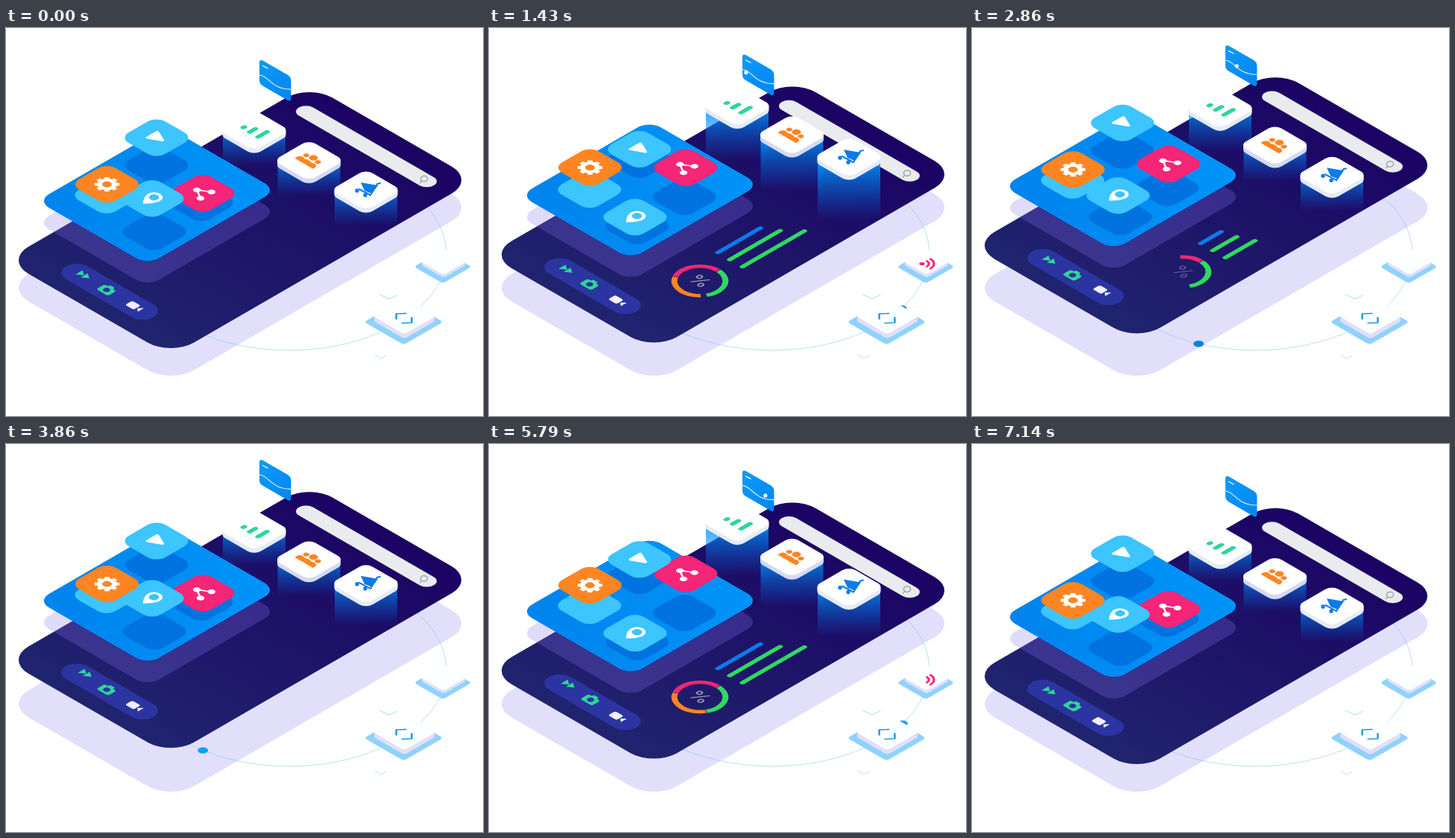
Write an HTML page with a canvas that moves like this. It is 640x520 px and loops after 7210 ms.

```html
<!DOCTYPE html>
<html lang="en">
<head>
<meta charset="utf-8">
<style>
  html, body { margin: 0; width: 100%; height: 100%; overflow: hidden; background: #fff; }
  canvas { display: block; }
</style>
</head>
<body>
<canvas id="stage" width="640" height="520"></canvas>
<script>
const ctx = document.getElementById('stage').getContext('2d');
const LOOP = 7210, HALF = LOOP / 2, TAU = Math.PI * 2;
const SKY = '#3cc5ff', PINK = '#f52577', ORANGE = '#ff8522', MINT = '#2ed59a',
      GREEN = '#2fd95f', BLUE = '#0b7be8', WHITE = '#fff';

// Sine-eased progress from time a to time b.
const ease = (t, a, b) => (1 - Math.cos(Math.PI * Math.min(1, Math.max(0, (t - a) / (b - a))))) / 2;
const pulse = (t, a, b, c, d) => ease(t, a, b) - ease(t, c, d);
const bump = (t, a, b) => t > a && t < b ? Math.sin(Math.PI * (t - a) / (b - a)) ** 2 : 0;

function at(x, y, draw) {
  ctx.save();
  ctx.translate(x, y);
  draw();
  ctx.restore();
}
// Ground plane: u runs down-right, v runs down-left.
function iso(x, y, draw) {
  at(x, y, () => { ctx.transform(.866, .5, -.866, .5, 0, 0); draw(); });
}
function slab(x, y, hu, hv, r, fill) {
  iso(x, y, () => {
    ctx.beginPath();
    ctx.roundRect(-hu, -hv, 2 * hu, 2 * hv, r);
    ctx.fillStyle = fill;
    ctx.fill();
  });
}
function disc(x, y, r, fill) {
  ctx.beginPath();
  ctx.arc(x, y, r, 0, TAU);
  ctx.fillStyle = fill;
  ctx.fill();
}
function trace(points, close) {
  ctx.beginPath();
  points.forEach(([x, y]) => ctx.lineTo(x, y));
  if (close) ctx.closePath();
}
function line(points, color, width, cap = 'round') {
  trace(points);
  Object.assign(ctx, { strokeStyle: color, lineWidth: width, lineCap: cap, lineJoin: 'round' });
  ctx.stroke();
}
function poly(points, fill) {
  trace(points, true);
  ctx.fillStyle = fill;
  ctx.fill();
}
function gradient(x0, y0, x1, y1, from, to) {
  const g = ctx.createLinearGradient(x0, y0, x1, y1);
  g.addColorStop(0, from);
  g.addColorStop(1, to);
  return g;
}

const icons = {
  chart() {
    line([[-12, 5], [-12, 3]], MINT, 6);
    line([[-1, 6], [-1, -3]], MINT, 6);
    line([[12, 6], [12, -8]], MINT, 6);
  },
  people() {
    for (const [u, v, size] of [[-9, 0, .8], [9, 0, .8], [0, 0, 1.15]]) {
      disc(u, v - 6 * size, 4.3 * size, ORANGE);
      ctx.beginPath();
      ctx.roundRect(u - 6.5 * size, v, 13 * size, 8, [6, 6, 1, 1]);
      ctx.fill();
    }
  },
  gear() {
    for (let i = 0; i < 8; i++) {
      const a = i * TAU / 8, c = Math.cos(a), s = Math.sin(a);
      line([[8 * c, 8 * s], [13.6 * c, 13.6 * s]], WHITE, 5.5, 'butt');
    }
    disc(0, 0, 10.8, WHITE);
    disc(0, 0, 5.3, ORANGE);
  },
  play() {
    const shape = [[-7, -8], [-7, 7], [8, -1]];
    poly(shape, WHITE);
    line([...shape, shape[0]], WHITE, 4);
  },
  pin() {
    ctx.beginPath();
    ctx.arc(0, -3, 9.5, Math.PI * .86, Math.PI * .14);
    ctx.quadraticCurveTo(7, 7, 0, 14);
    ctx.quadraticCurveTo(-7, 7, -8.6, 1);
    ctx.fillStyle = WHITE;
    ctx.fill();
    disc(0, -3, 5.6, SKY);
  },
  share() {
    line([[5, -8.5], [-9, 0], [5, 8.5]], WHITE, 2.2);
    for (const [u, v] of [[5, -8.5], [-9, 0], [5, 8.5]]) disc(u, v, 4.3, WHITE);
  },
  forward() {
    for (const u of [-7, 1]) poly([[u, -5.5], [u, 5.5], [u + 8, 0]], MINT);
  },
  camera() {
    ctx.beginPath();
    ctx.roundRect(-9, -6, 18, 13, 3);
    ctx.roundRect(-4, -9, 8, 5, 2);
    ctx.fillStyle = MINT;
    ctx.fill();
    disc(0, 0, 4, '#2b34a0');
  },
  video() {
    ctx.beginPath();
    ctx.roundRect(-9, -6, 13, 11, 2.5);
    ctx.fillStyle = '#f0f0f6';
    ctx.fill();
    poly([[5, 0], [10, -5], [10, 4.5]], '#f0f0f6');
  },
  code() {
    line([[-5, -8], [-12, 0], [-5, 7]], '#159bea', 2);
    line([[5, -7], [12, 0], [5, 8]], '#159bea', 2);
  }
};

function drawCart(x, y) {
  at(x, y, () => {
    poly([[-7, -10], [16, -6], [8, 5], [-2, 1]], BLUE);
    line([[19, -9], [15, -8], [6, 7], [-9, -1]], BLUE, 2);
    disc(-12, 1, 2.7, BLUE);
    disc(-1, 7, 2.7, BLUE);
  });
}

function tile(x, y, color, icon) {
  slab(x, y, 28.6, 28.6, 14, color);
  if (icon) iso(x, y, icons[icon]);
}

function cube(x, base, rise, side, drawIcon) {
  const y = base - rise, foot = base + 48;
  ctx.beginPath();
  ctx.rect(x - 42, y + 4, 84, foot - y - 4);
  ctx.fillStyle = gradient(0, y, 0, foot, `rgba(0,152,255,${.75 + rise * .006})`, 'rgba(0,110,230,0)');
  ctx.fill();
  for (let k = 6; k > 0; k--) slab(x, y + k, 27.4, 27.4, 10, side);
  slab(x, y, 27.4, 27.4, 10, WHITE);
  drawIcon(x, y);
}
const flat = name => (x, y) => iso(x, y, icons[name]);

function drawOrbit(t) {
  const cx = 380, cy = 302, rx = 211, ry = 130;
  ctx.beginPath();
  ctx.ellipse(cx, cy, rx, ry, 0, 0, TAU);
  ctx.strokeStyle = 'rgba(125,195,230,.6)';
  ctx.lineWidth = .9;
  ctx.stroke();
  const swing = (1 - Math.cos(TAU * t / LOOP)) / 2;
  const a = Math.max(8, 137 * swing - 12) * Math.PI / 180;
  ctx.beginPath();
  ctx.ellipse(cx + rx * Math.cos(a), cy + ry * Math.sin(a), 7, 4.2, 0, 0, TAU);
  ctx.fillStyle = t < HALF ? '#0c80dd' : '#00a2ff';
  ctx.fill();
}

function drawSideTiles(p) {
  const pad = (x, y, half, lift, thick) => {
    slab(x, y, half, half, 4, '#90d2ff');
    const top = half * .8;
    for (let k = thick; k > 0; k--) slab(x + 1, y - lift + k, top, top, 4, '#e0e0f7');
    slab(x + 1, y - lift, top, top, 4, '#fdfefe');
  };
  pad(586, 320, 22.3, 7, 4);
  pad(533.5, 394, 30.6, 8, 6);
  iso(534, 389, icons.code);
  line([[501, 357], [514, 363], [525, 358]], '#a9dcec', 1);
  line([[495, 438], [503, 443], [510, 439]], '#b5e1ee', 1);

  const within = (a, b) => p >= a && p < b;
  iso(581, 316, () => {
    if (within(1000, 2120)) disc(0, 0, 3, PINK);
    const wave = r => {
      ctx.beginPath();
      ctx.arc(0, 0, r, -TAU / 4, 0);
      ctx.strokeStyle = PINK;
      ctx.lineWidth = 2.6;
      ctx.lineCap = 'round';
      ctx.stroke();
    };
    if (within(800, 1900) || within(2120, 2500)) wave(7.5);
    if (within(1100, 2700)) wave(13);
  });
}

function drawStats(p) {
  const keep = 1 - ease(p, 2500, 3200);
  const bars = [[307, 308.5, 66, BLUE, 450], [323, 318, 78, GREEN, 600], [340, 327.5, 96, GREEN, 800]];
  for (const [x, y, length, color, start] of bars) {
    const grown = ease(p, start, start + 600) * keep;
    if (grown > .005) iso(x, y, () => line([[0, 0], [0, -length * grown]], color, 6));
  }
  const sweep = 360 * ease(p, 800, 1520) * keep, rad = Math.PI / 180;
  iso(283, 346.5, () => {
    [GREEN, PINK, ORANGE].forEach((color, i) => {
      const span = Math.min(118.5, sweep - i * 120);
      if (span <= 0) return;
      const start = 30 - i * 120;
      ctx.beginPath();
      ctx.arc(0, 0, 28, start * rad, (start - span) * rad, true);
      Object.assign(ctx, { strokeStyle: color, lineWidth: 6.5, lineCap: 'butt' });
      ctx.stroke();
    });
    ctx.globalAlpha = ease(p, 950, 1300) * keep;
    ctx.fillStyle = '#9a98b8';
    ctx.font = '500 24px Inter, sans-serif';
    ctx.textAlign = 'center';
    ctx.textBaseline = 'middle';
    ctx.fillText('%', 0, 1);
  });
}

function drawDock(p) {
  const q = p % (HALF / 2);
  iso(139, 353.5, () => {
    ctx.beginPath();
    ctx.roundRect(-67.8, -17, 135.6, 34, 17);
    ctx.fillStyle = '#2b34a0';
    ctx.fill();
  });
  const hop = (name, x, y, lift) => iso(x + 3.2 * lift, y - 1.9 * lift, icons[name]);
  hop('forward', 104, 331, bump(q, 0, 640));
  hop('camera', 135, 351, bump(q, 200, 1050));
  hop('video', 172, 373, bump(q, 560, 1250));
}

function drawSearch() {
  iso(483.5, 158.8, () => {
    ctx.beginPath();
    ctx.roundRect(-104.5, -11, 209, 22, 11);
    ctx.fillStyle = '#e9ebee';
    ctx.fill();
  });
  ctx.beginPath();
  ctx.ellipse(561, 202, 4.6, 3.8, 0, 0, TAU);
  ctx.strokeStyle = '#a3a4b2';
  ctx.lineWidth = 1.5;
  ctx.stroke();
  line([[557.5, 205], [555.5, 207.5]], '#a3a4b2', 1.5);
}

function drawPanel(p) {
  const body = (y, fill) => slab(202.5, y, 85.5, 100, 18, fill);
  body(253.5, 'rgba(135,115,240,.26)');
  body(224.5, gradient(60, -60, -60, 90, '#0092f7', '#0084ee'));
  for (const [x, y] of [[202, 184], [262, 234], [199, 273]]) tile(x, y, '#0073e0');
  tile(135, 224, SKY);
  tile(264, 221.5 - 40 * pulse(p, 850, 1800, 2300, 3400), PINK, 'share');
  tile(196, 228.5 + 32.5 * pulse(p, 600, 1450, 2300, 3400), SKY, 'pin');
  tile(135.5, 209.5 - 15 * pulse(p, 200, 1000, 1950, 2900), ORANGE, 'gear');
  tile(202, 147 + 23 * pulse(p, 0, 850, 1750, 2850), SKY, 'play');
}

function drawCard(p) {
  ctx.save();
  ctx.transform(.866, .5, 0, 1, 340, 41);
  ctx.beginPath();
  ctx.roundRect(0, 0, 49, 34, 5);
  ctx.fillStyle = gradient(0, 0, 49, 34, '#0a9cfb', '#0784ee');
  ctx.fill();
  ctx.restore();
  line([[344.5, 50.5], [351, 54]], WHITE, 1.3);
  ctx.beginPath();
  ctx.moveTo(340, 63);
  ctx.bezierCurveTo(352, 63, 356, 83, 382.5, 82);
  ctx.strokeStyle = '#d9f1ff';
  ctx.lineWidth = 1.2;
  ctx.stroke();
  const k = (p % (HALF / 2) - 300) / 1200;
  if (k > 0 && k < 1.05) {
    const x = 372 - 29 * k ** 1.2;
    disc(x, 71.5 + 9 * Math.sin((x - 357) / 24), 2.6, WHITE);
  }
}

function draw(t) {
  const p = t % HALF;
  ctx.fillStyle = WHITE;
  ctx.fillRect(0, 0, 640, 520);
  const phone = (y, fill) => slab(314, y, 128.4, 235.7, 36, fill);
  phone(294.5, '#e2dffa');
  drawOrbit(t);
  drawSideTiles(p);
  at(0, -11 * (1 - Math.cos(TAU * t / LOOP)), () => {
    phone(257.5, gradient(0, -235, 0, 235, '#1b0363', '#20246e'));
    drawSearch();
    drawDock(p);
    drawStats(p);
    cube(333, 137, 25 * pulse(p, 255, 1300, 2150, 3400), '#e6ebf8', flat('chart'));
    cube(406.5, 177.5, 27 * pulse(p, 150, 1050, 1700, 3000), '#d6d9f4', flat('people'));
    cube(483, 217, 36.5 * pulse(p, 0, 800, 1465, 2900), '#e6ebf8', drawCart);
    drawPanel(p);
    drawCard(p);
  });
}

function frame() {
  draw(performance.now() % LOOP);
  requestAnimationFrame(frame);
}
frame();
</script>
</body>
</html>
```
